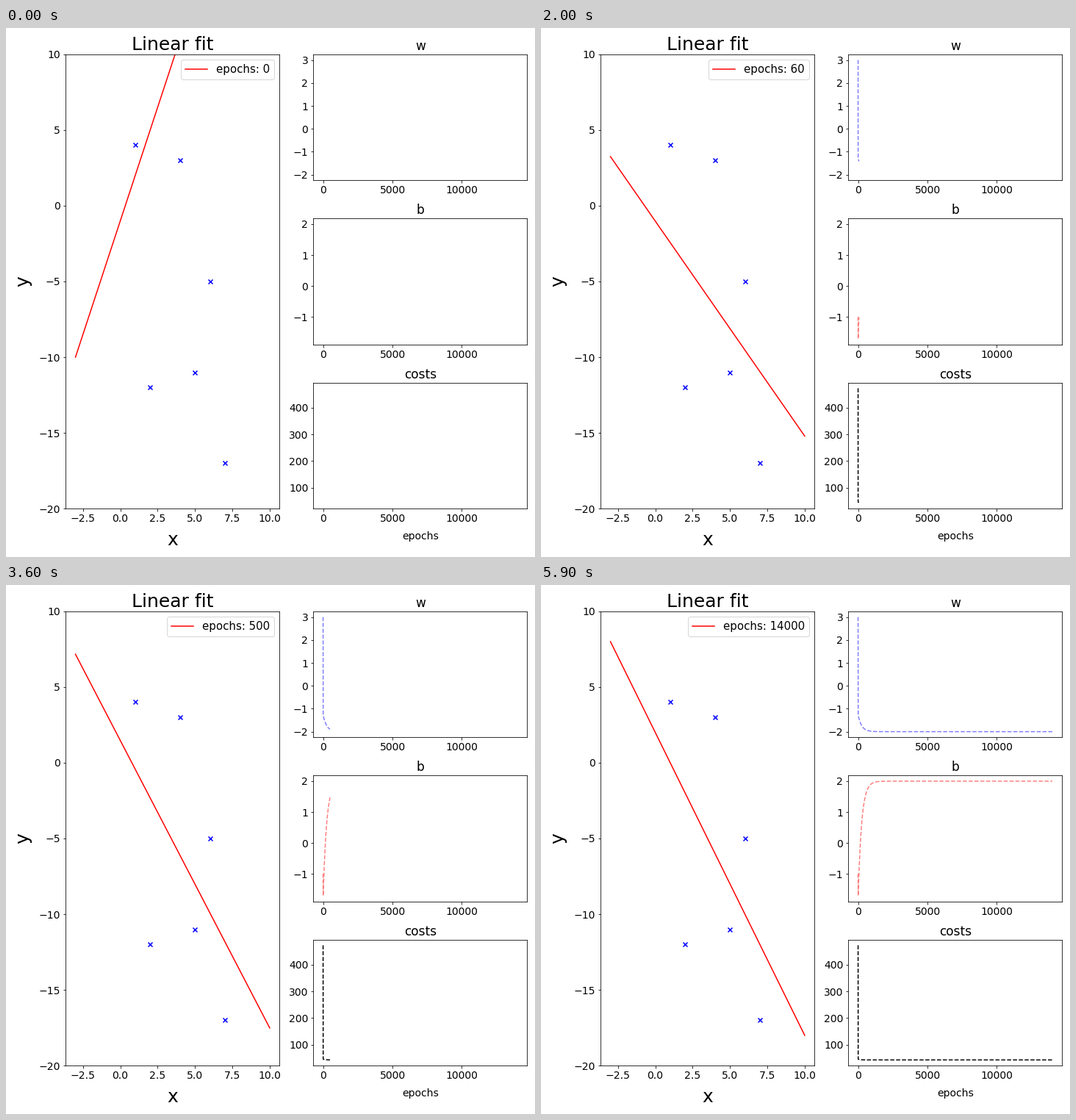
A matplotlib script for the animation above (6000 ms loop, 720x720 px).

```python
import matplotlib.pyplot as plt
import numpy as np
from matplotlib.animation import FuncAnimation

SIZE = 720
RATE = 0.02
LAST = 14000

# Panel layout in pixels
TOP, WIDTH = 35.8, 290.85
FIT_LEFT, HISTORY_LEFT = 81.3, 418.35
ROW, GAP = 171.6, 51.8

plt.rcParams.update({
    "font.family": "DejaVu Sans",
    "xtick.labelsize": 14,
    "ytick.labelsize": 14,
})

x = np.array([1, 2, 4, 5, 6, 7])
y = np.array([4, -12, 3, -11, -5, -17])

# The shown epochs get sparser as the fit settles.
shown = [*range(10), *range(10, 100, 5), *range(100, 1000, 50),
         *range(1000, LAST + 1, 1000)]


def descend(w, b):
    """Batch gradient descent; returns w, b and mean squared error per epoch."""
    history = []
    for _ in range(LAST + 1):
        error = w * x + b - y
        history.append((w, b, np.mean(error ** 2)))
        w -= RATE * np.mean(error * x)
        b -= RATE * np.mean(error)
    return np.array(history).T


epochs = np.arange(LAST + 1)
weights, biases, costs = descend(3.0, -1.0)

fig = plt.figure(figsize=(10, 10), dpi=72)


def add_axes(left, top, height):
    """Axes placed in pixels from the top left corner."""
    return fig.add_axes([left / SIZE, 1 - (top + height) / SIZE,
                         WIDTH / SIZE, height / SIZE])


# Fit panel
fit_ax = add_axes(FIT_LEFT, TOP, 3 * ROW + 2 * GAP)
fit_ax.set_title("Linear fit", fontsize=25)
fit_ax.set_xlabel("x", fontsize=25, labelpad=10)
fit_ax.set_ylabel("y", fontsize=25, labelpad=10)
fit_ax.set_xlim(-3.65, 10.65)
fit_ax.set_ylim(-20, 10)
fit_ax.set_xticks(np.arange(-2.5, 10.1, 2.5))
fit_ax.set_yticks(range(-20, 11, 5))
fit_ax.scatter(x, y, marker="x", color="blue")

ends = np.array([-3, 10])
fit_line, = fit_ax.plot(ends, ends, color="red", label="epochs: 0")
legend = fit_ax.legend(loc="upper right", fontsize=15)
label = legend.get_texts()[0]


# History panels
def add_history(row, title, values, ticks, color, alpha):
    ax = add_axes(HISTORY_LEFT, TOP + row * (ROW + GAP), ROW)
    ax.set_title(title, fontsize=17)
    line, = ax.plot(epochs, values, "--", color=color, alpha=alpha)
    ax.set_xlim(ax.get_xlim())
    ax.set_ylim(ax.get_ylim())
    ax.set_xticks([0, 5000, 10000])
    ax.set_yticks(ticks)
    return line, values


histories = [
    add_history(0, "w", weights, range(-2, 4), "blue", 0.5),
    add_history(1, "b", biases, range(-1, 3), "red", 0.5),
    add_history(2, "costs", costs, range(100, 401, 100), "black", 1),
]
histories[-1][0].axes.set_xlabel("epochs", fontsize=14, labelpad=10)


def update(frame):
    epoch = shown[frame]
    fit_line.set_ydata(weights[epoch] * ends + biases[epoch])
    label.set_text(f"epochs: {epoch}")
    for line, values in histories:
        line.set_data(epochs[:epoch + 1], values[:epoch + 1])


anim = FuncAnimation(fig, update, frames=len(shown), interval=100,
                     init_func=lambda: update(0), repeat=True, repeat_delay=0)
plt.show()
```
